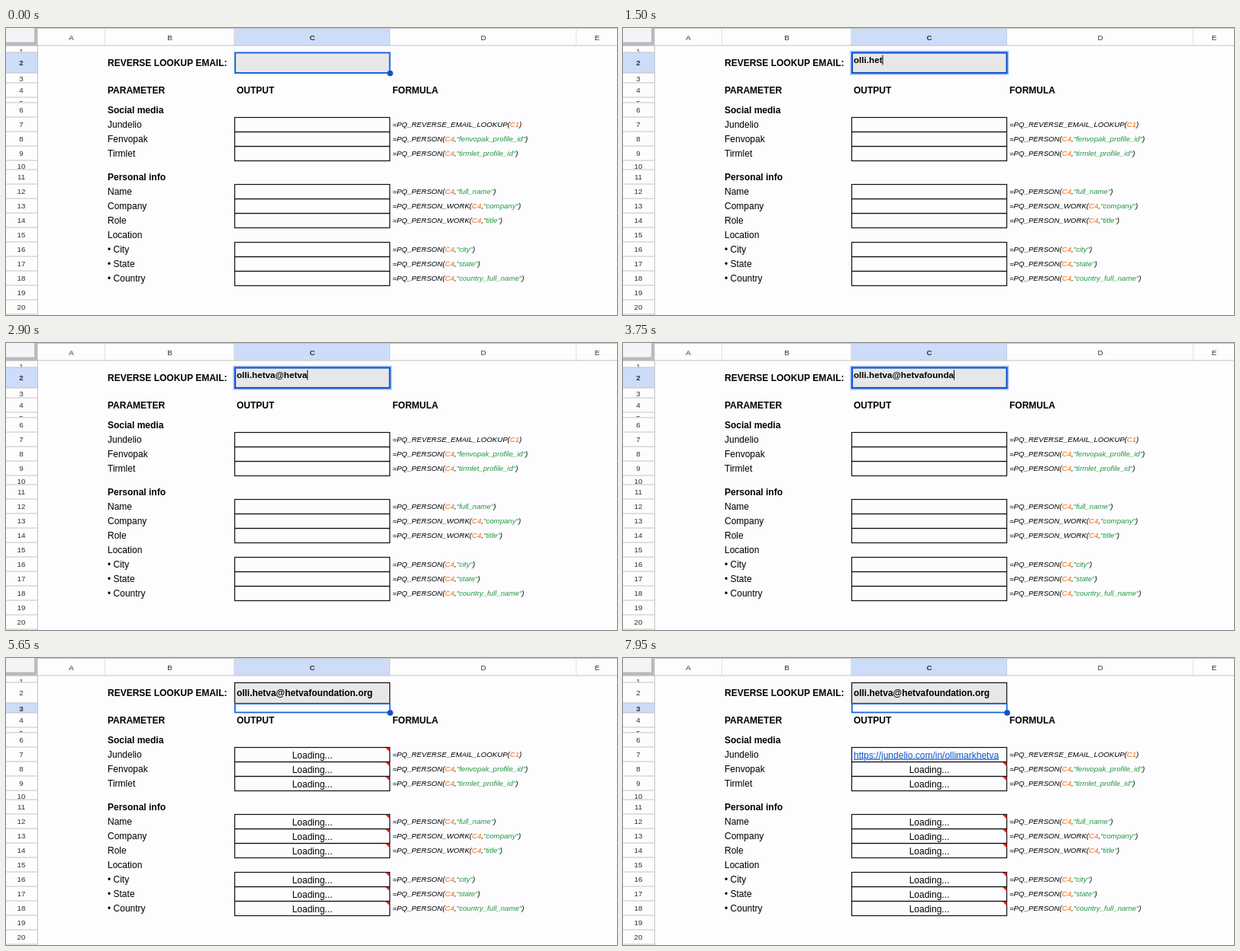
An HTML page for the animation above (8000 ms loop, 800 by 377 pixels).

```html
<!DOCTYPE html>
<html lang="en">
<head>
<meta charset="utf-8">
<title>Reverse lookup sheet</title>
<style>
  html, body { margin: 0; width: 100%; height: 100%; overflow: hidden; background: #fdfcfe; }
  svg { display: block; width: 100%; height: 100%; }
  text { font-family: "Liberation Sans", Arial, Helvetica, sans-serif; font-size: 12px; fill: #000; white-space: pre; }
  .b { font-weight: 700; }
  .head { font-size: 9.8px; fill: #333; text-anchor: middle; }
  .formula { font-size: 9.65px; font-style: italic; }
  .ref { fill: #f06a0a; }
  .str { fill: #1f983f; }
  .mid { text-anchor: middle; }
  .link { fill: #1155cc; text-decoration: underline; }
</style>
</head>
<body>
<svg id="stage" viewBox="0 0 800 377"></svg>
<script>
(() => {
const NS = 'http://www.w3.org/2000/svg';
const stage = document.getElementById('stage');
const LOOP = 8000, EDIT = 400, COMMIT = 4500, FOUND = 7400;
const EMAIL = 'olli.hetva@hetvafoundation.org';
const LINK = 'https://jundelio.com/in/ollimarkhetva';
const LINE = '#c3c4c6', PICKED = '#cddcf8', PLAIN = '#fdfdfe';
const LEFT = 299, RIGHT = 503;
const TOPS = [23, 32, 59, 72, 91, 98, 117, 136, 155, 174, 186,
  205, 224, 243, 262, 281, 300, 319, 338, 357, 376, 395];
const rowTop = row => TOPS[row - 1];

function add(name, attrs, parent = stage, content) {
  const el = document.createElementNS(NS, name);
  for (const key in attrs) el.setAttribute(key, attrs[key]);
  if (content !== undefined) el.textContent = content;
  parent.appendChild(el);
  return el;
}
const rect = (x, y, width, height, fill, parent) =>
  add('rect', { x, y, width, height, fill }, parent);
const frame = (x, y, width, height, stroke, weight, parent) =>
  add('rect', { x, y, width, height, fill: 'none', stroke, 'stroke-width': weight }, parent);
const text = (x, y, content, cls = '', parent) =>
  add('text', { x, y, class: cls }, parent, content);
const show = (el, on) => el.setAttribute('visibility', on ? 'visible' : 'hidden');

rect(0, 0, 800, 377, '#fdfcfe');

// Row headings: later rows cover the overflow of short ones
const heads = [];
for (let row = 1; row <= 21; row++) {
  const y = rowTop(row), h = rowTop(row + 1) - y;
  const bg = rect(0, y, 41, h, PLAIN);
  const base = Math.max(y + h / 2 + 3.5, y + 10.5);
  const label = text(20, base, row, 'head');
  rect(0, y - .5, 41, 1, LINE);
  heads[row] = { bg, label };
}
rect(41, 23, 1, 354, LINE);

// Column headings
const edges = [41, 130, LEFT, RIGHT, 747, 801];
[...'ABCDE'].forEach((letter, i) => {
  const x = edges[i], w = edges[i + 1] - x, on = letter === 'C';
  rect(x, 0, w, 23, on ? PICKED : PLAIN);
  text(x + w / 2, 15.5, letter, on ? 'head b' : 'head');
  rect(x + w - .5, 0, 1, 23, LINE);
});
rect(0, 0, 800, 1, LINE);
rect(0, 22.5, 800, 1, LINE);
rect(0, 0, 41, 23, '#f3f4f5');
rect(37, 0, 4.5, 23, '#b9bbbe');
rect(0, 18.5, 41, 4.5, '#b9bbbe');

// Titles and labels
text(133, 49.5, 'REVERSE LOOKUP EMAIL:', 'b');
text(133, 86, 'PARAMETER', 'b');
text(302, 86, 'OUTPUT', 'b');
text(506, 86, 'FORMULA', 'b');
text(133, 112, 'Social media', 'b');
text(133, 200, 'Personal info', 'b');
text(133, 276, 'Location');

// Row, label, function, quoted argument
const FIELDS = [
  [7, 'Jundelio', 'REVERSE_EMAIL_LOOKUP', ''],
  [8, 'Fenvopak', 'PERSON', 'fenvopak_profile_id'],
  [9, 'Tirmlet', 'PERSON', 'tirmlet_profile_id'],
  [12, 'Name', 'PERSON', 'full_name'],
  [13, 'Company', 'PERSON_WORK', 'company'],
  [14, 'Role', 'PERSON_WORK', 'title'],
  [16, '• City', 'PERSON', 'city'],
  [17, '• State', 'PERSON', 'state'],
  [18, '• Country', 'PERSON', 'country_full_name']
];
const pending = FIELDS.map(([row, label, fn, arg]) => {
  const y = rowTop(row);
  text(133, y + 14, label);
  const formula = text(506, y + 12.5, '', 'formula');
  const part = (s, cls = '') => add('tspan', { class: cls }, formula, s);
  part(`=PQ_${fn}(`);
  part(arg ? 'C4' : 'C1', 'ref');
  if (arg) {
    part(',');
    part(`"${arg}"`, 'str');
  }
  part(')');
  frame(LEFT + .5, y + .5, RIGHT - LEFT - 1, 19, '#111', 1.2);
  const g = add('g', {});
  text(401, y + 14.5, 'Loading...', 'mid', g);
  add('path', { d: `M${RIGHT - 6} ${y + 1}H${RIGHT - .5}V${y + 6.5}Z`, fill: '#e0231c' }, g);
  return g;
});
const link = text(302, 131.5, LINK, 'link');

// Email cell in its three states
rect(LEFT, 32, RIGHT - LEFT, 27, '#e8e7e8');
const idle = add('g', {});
frame(300, 32.5, 202.5, 26.5, '#1c66df', 2, idle);
add('circle', { cx: 503, cy: 59.5, r: 3.8, fill: '#1850c0' }, idle);

const edit = add('g', {});
frame(298.5, 31, 205.5, 29.5, '#a9c8f8', 2.5, edit);
frame(300, 32.5, 202.5, 26.5, '#1155cf', 2.2, edit);
const typed = text(302, 45.8, '', 'b', edit);
typed.style.fontSize = '11.65px';
const caret = rect(302, 35.5, 1, 13, '#000', edit);

const done = add('g', {});
frame(LEFT + .5, 32.5, RIGHT - LEFT - 1, 27, '#111', 1.2, done);
text(302, 49.5, EMAIL, 'b', done).style.fontSize = '11.9px';
frame(299.8, 60, 202.8, 11.5, '#1c66df', 1.8, done);
add('circle', { cx: 503, cy: 72, r: 3.8, fill: '#1850c0' }, done);

// Time and characters typed, linear in between
const KEYS = [[400, 0], [780, 4], [2030, 11], [3730, 22], [4380, 30]];
function typedCount(t) {
  for (let i = 1; i < KEYS.length; i++) {
    const [t0, n0] = KEYS[i - 1], [t1, n1] = KEYS[i];
    if (t < t1) return Math.floor(n0 + (n1 - n0) * Math.max(0, t - t0) / (t1 - t0));
  }
  return EMAIL.length;
}

function pick(row, on) {
  heads[row].bg.setAttribute('fill', on ? PICKED : PLAIN);
  heads[row].label.setAttribute('class', on ? 'head b' : 'head');
}

function render(t) {
  const committed = t >= COMMIT, found = t >= FOUND;
  show(idle, t < EDIT);
  show(edit, t >= EDIT && !committed);
  show(done, committed);
  show(link, found);
  pending.forEach((g, i) => show(g, committed && !(found && i === 0)));
  pick(2, !committed);
  pick(3, committed);
  typed.textContent = EMAIL.slice(0, typedCount(t));
  caret.setAttribute('x', 302 + typed.getComputedTextLength());
}

const start = performance.now();
function tick() {
  render((performance.now() - start) % LOOP);
  requestAnimationFrame(tick);
}
tick();
})();
</script>
</body>
</html>
```
